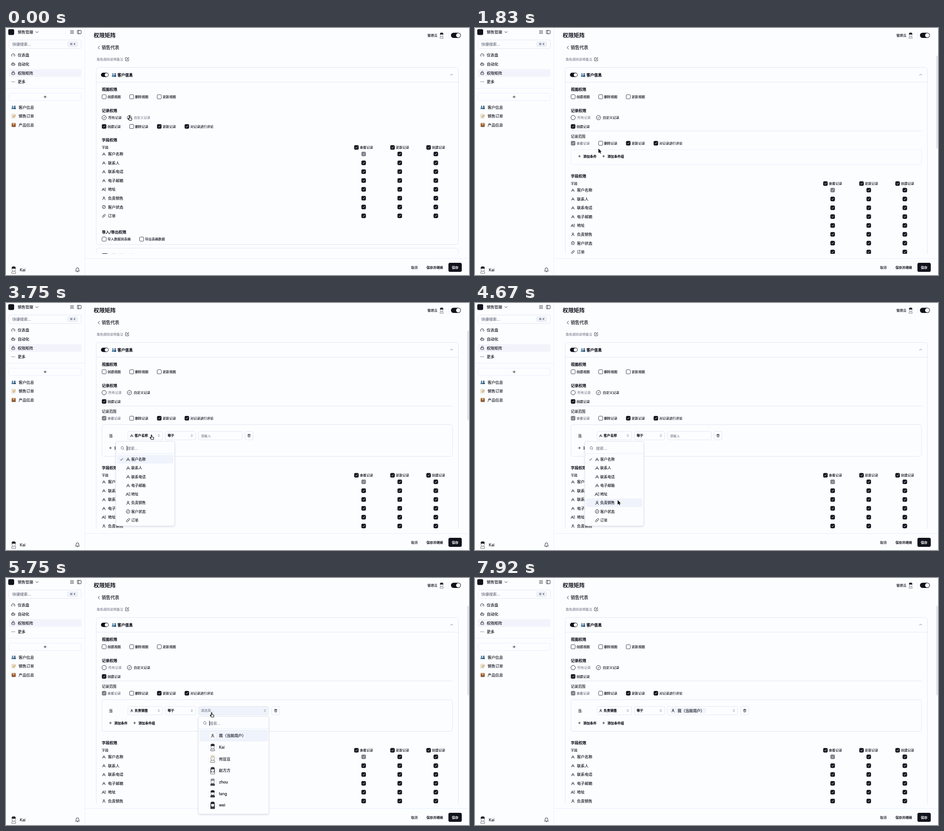
An HTML page with a canvas that plays this animation: 1024 by 547 pixels, repeating every 8000 ms.

```html
<!DOCTYPE html>
<html lang="zh-CN">
<head>
<meta charset="utf-8">
<title>权限矩阵</title>
<style>
html, body { margin: 0; width: 100%; height: 100%; overflow: hidden; background: #fcfdff; }
canvas { display: block; width: 1024px; height: 547px; }
</style>
</head>
<body>
<canvas></canvas>
<script>
const LOOP = 8000;
const INK = '#10131c', GRAY = '#676d7c', LINE = '#e3e6f0', PALE = '#e7eefc', BG = '#fcfdff', HOVER = '#eff3fb';
const canvas = document.querySelector('canvas'), ctx = canvas.getContext('2d');
const dpr = window.devicePixelRatio || 1;
canvas.width = 1024 * dpr;
canvas.height = 547 * dpr;

// Icon outlines on a 24 unit grid
const ICONS = {
  gauge: 'M12 14l4-4M4 19a10 10 0 1 1 16 0',
  bot: 'M12 8V4H8M5 8h14a2 2 0 0 1 2 2v8a2 2 0 0 1-2 2H5a2 2 0 0 1-2-2v-8a2 2 0 0 1 2-2zM1 14h2M21 14h2M15 13v2M9 13v2',
  lock: 'M5 11h14a2 2 0 0 1 2 2v7a2 2 0 0 1-2 2H5a2 2 0 0 1-2-2v-7a2 2 0 0 1 2-2zM7 11V7a5 5 0 0 1 10 0v4',
  dots: 'M3 12h2M11 12h2M19 12h2',
  menu: 'M3 5h18M3 12h18M3 19h18',
  panel: 'M4 3h16a2 2 0 0 1 2 2v14a2 2 0 0 1-2 2H4a2 2 0 0 1-2-2V5a2 2 0 0 1 2-2zM9 3v18',
  text: 'M3 21L12 4l9 17M6 15h12',
  longText: 'M0 21L8 4l8 17M3 15h10M16 5h8M18 12h6M19 20h5',
  user: 'M12 12a4.5 4.5 0 1 0 0-9 4.5 4.5 0 0 0 0 9zM4 22a8 8 0 0 1 16 0',
  status: 'M12 2a10 10 0 1 0 0 20 10 10 0 0 0 0-20zM7.5 12l3 3 6-6',
  link: 'M10 13a5 5 0 0 0 7.5.5l3-3a5 5 0 0 0-7-7l-1.7 1.7M14 11a5 5 0 0 0-7.5-.5l-3 3a5 5 0 0 0 7 7l1.7-1.7',
  search: 'M11 3a8 8 0 1 0 0 16 8 8 0 0 0 0-16zM17 17l4.5 4.5',
  edit: 'M11 3H4a2 2 0 0 0-2 2v15a2 2 0 0 0 2 2h15a2 2 0 0 0 2-2v-7M10 14l1-3 9-9 2 2-9 9z',
  bell: 'M4 17c2-2 2-4 2-8a6 6 0 0 1 12 0c0 4 0 6 2 8zM10 21h4',
  trash: 'M3 6h18M19 6v14a2 2 0 0 1-2 2H7a2 2 0 0 1-2-2V6M8 6V2h8v4M12 11v6',
  plus: 'M12 4v16M4 12h16',
  check: 'M5 13l5 5L20 6',
  down: 'M5 9l7 7 7-7',
  up: 'M5 15l7-7 7 7',
  back: 'M15 4l-7 8 7 8',
  sort: 'M7 9l5-5 5 5M7 15l5 5 5-5'
};
for (const k in ICONS) ICONS[k] = new Path2D(ICONS[k]);
const ARROW = new Path2D('M0 0v10l2.3-2.2 1.6 3.5 1.5-.7-1.5-3.4H7z');
const HAND = new Path2D('M0 .8c0-1.1 1.6-1.1 1.6 0v3.5l3.3.9c.8.2 1 .8.9 1.5L5.2 10H.4L-2.4 6.7c-.5-.9.5-1.4 1.2-.9L0 6.7z');

const FIELDS = [['text', '客户名称'], ['text', '联系人'], ['text', '联系电话'], ['text', '电子邮箱'],
  ['longText', '地址'], ['user', '负责销售'], ['status', '客户状态'], ['link', '订单']];
const ME = '我（当前用户）', OWNER = 'Kai';
const PEOPLE = [ME, OWNER, '何豆豆', '赵方方', 'zhou', 'tang', 'wei'];

const FADE = 150;
const T = { custom: 1000, addRow: 2420, open1: 3330, close1: 4830, open2: 5580, pick: 6700, close2: 6795 };

// time, x, y of the pointer tip, shape
const PATH = [[0, 272.5, 194.5, HAND], [80, 272.5, 194.5, HAND], [330, 274.5, 199, HAND], [750, 274.5, 199, HAND],
  [830, 274, 199.5, HAND], [1500, 274, 199.5, ARROW], [1830, 273, 267, ARROW], [2170, 266, 282, HAND],
  [2600, 266, 282, HAND], [2920, 321, 292, HAND], [3850, 321, 292, ARROW], [4420, 314, 462, ARROW],
  [4670, 315.5, 436.5, ARROW], [4950, 315.5, 436.5, ARROW], [5450, 454, 298, HAND], [5950, 454, 298, HAND],
  [6330, 458, 341, HAND], [7250, 458, 341, ARROW], [7750, 503, 328, ARROW], [7900, 503, 328, null], [LOOP, 503, 328, null]];

const clamp = (v, a = 0, b = 1) => Math.min(b, Math.max(a, v));
const ease = p => p * p * (3 - 2 * p);

function pointer(t) {
  const i = PATH.findIndex(k => k[0] > t) - 1, [t0, x0, y0, shape] = PATH[i], [t1, x1, y1] = PATH[i + 1];
  const p = ease((t - t0) / (t1 - t0));
  return { x: x0 + (x1 - x0) * p, y: y0 + (y1 - y0) * p, shape };
}

// y is the middle of the line; heavy thickens the strokes
function text(s, x, y, size = 7.33, color = INK, heavy = 0.15) {
  ctx.font = `${heavy >= 1 ? 'bold ' : ''}${size}px Inter, "Noto Sans CJK SC", "Noto Sans CJK", sans-serif`;
  ctx.fillStyle = ctx.strokeStyle = color;
  ctx.fillText(s, x, y + size * 0.37);
  if (heavy > 0 && heavy < 1) {
    ctx.lineWidth = heavy;
    ctx.strokeText(s, x, y + size * 0.37);
  }
}
function box(x, y, w, h, r, fill, stroke, width = 1) {
  ctx.beginPath();
  ctx.roundRect(x, y, w, h, r);
  if (fill) { ctx.fillStyle = fill; ctx.fill(); }
  if (stroke) { ctx.strokeStyle = stroke; ctx.lineWidth = width; ctx.stroke(); }
}
function disc(x, y, r, fill, stroke, width = 1) {
  box(x - r, y - r, 2 * r, 2 * r, r, fill, stroke, width);
}
function rule(x, y, w, h, color) {
  ctx.fillStyle = color;
  ctx.fillRect(x, y, w, h);
}
function icon(name, x, y, size = 9, color = INK, width = 0.9) {
  ctx.save();
  ctx.translate(x - size / 2, y - size / 2);
  ctx.scale(size / 24, size / 24);
  ctx.lineWidth = width * 24 / size;
  ctx.lineCap = ctx.lineJoin = 'round';
  ctx.strokeStyle = color;
  ctx.stroke(ICONS[name]);
  ctx.restore();
}
function toggle(x, y, w, h) {
  box(x, y, w, h, h / 2, INK);
  disc(x + w - h / 2, y + h / 2, h / 2 - 1, '#fff');
}
function tick(x, y, on = true, color = INK) {
  box(x - 4.6, y - 4.6, 9.2, 9.2, 2, on ? color : BG, color, 0.8);
  if (on) icon('check', x, y, 7, '#fff', 0.9);
}
function option(x, y, label, on, color = INK) {
  tick(x, y, on, color === INK ? INK : '#7b7e86');
  text(label, x + 7.5, y, 7.33, color);
}
function radio(x, y, label, on) {
  disc(x, y, 4.8, null, INK, 0.9);
  if (on) icon('check', x, y, 6.5);
  text(label, x + 9.5, y, 7.33, on ? INK : GRAY, on ? 0.15 : 0);
}

function peopleIcon(x, y) {
  for (const [dx, c] of [[2.4, '#27486a'], [-2.4, '#3f76a3']]) {
    box(x + dx - 2.3, y, 4.6, 4, [2, 2, 0, 0], c);
    disc(x + dx, y - 2, 1.7, c);
  }
}
function noteIcon(x, y) {
  box(x - 4.5, y - 4.5, 8, 9, 1, '#f1eee4', '#c9c3b2', 0.6);
  for (let i = 0; i < 3; i++) rule(x - 3, y - 2.5 + i * 2.2, 5, 0.7, '#9aa0aa');
  ctx.beginPath();
  ctx.moveTo(x - 1, y + 2.5);
  ctx.lineTo(x + 4.5, y - 2.5);
  ctx.lineWidth = 1.8;
  ctx.strokeStyle = '#eda63a';
  ctx.stroke();
}
function boxIcon(x, y) {
  box(x - 4.5, y - 3, 9, 7.5, 1, '#8f5c36');
  box(x - 4.5, y - 4.5, 9, 3, 1, '#b98150');
  rule(x - 1, y - 4.5, 2, 5, '#dcbb8c');
}

// Faceless bust
function avatar(x, y, k = 1, hair = '#23252c', coat = '#f4f4f6', long = false) {
  ctx.save();
  ctx.translate(x, y);
  ctx.scale(k, k);
  if (long) box(-4.7, -6.5, 9.4, 13, [4.7, 4.7, 1, 1], hair);
  box(-4.5, 3, 9, 5, [3, 3, 0.5, 0.5], coat, '#3a3c43', 0.7);
  box(-3.6, -5, 7.2, 8.5, 3.4, '#fff', '#3a3c43', 0.7);
  box(-4.5, -7.5, 9, 5, [3.5, 3.5, 1.5, 1.5], hair);
  ctx.restore();
}

function sidebar() {
  rule(174, 0, 1, 547, PALE);
  rule(0, 133, 174, 1, PALE);
  box(5, 2.5, 13, 13, 3, INK);
  text('销售管理', 26, 9, 8.5);
  icon('down', 68.5, 9, 9);
  icon('menu', 146, 9, 10);
  icon('panel', 162, 9, 10);
  box(6.5, 26.5, 160, 19, 3, BG, LINE);
  text('快捷搜索...', 14, 36, 8.5, '#50566a', 0);
  box(136.5, 30.5, 22, 11, 2.5, '#f1f4fa', LINE);
  text('⌘ K', 141, 36, 6.7, '#50566a', 0.1);
  box(6, 91, 161, 17, 3, '#f3f4fb');
  [['gauge', '仪表盘'], ['bot', '自动化'], ['lock', '权限矩阵'], ['dots', '更多']].forEach(([name, label], i) => {
    icon(name, 16, 60.2 + i * 19.6, 9);
    text(label, 26, 60.2 + i * 19.6, 8.5);
  });
  box(6.5, 144.5, 160, 16, 3, null, PALE);
  icon('plus', 86.5, 152.5, 8);
  [[peopleIcon, '客户信息'], [noteIcon, '销售订单'], [boxIcon, '产品信息']].forEach(([draw, label], i) => {
    draw(17, 175.6 + i * 19.6);
    text(label, 28, 175.6 + i * 19.6, 8.5);
  });
  avatar(17, 535.5);
  text(OWNER, 30.5, 536, 8.5);
  icon('bell', 158, 535.5, 12);
}

function frame() {
  text('权限矩阵', 194, 16.5, 12.2, INK, 1);
  text('管理员', 932, 16.5);
  avatar(963.5, 16.5, 0.82);
  rule(978, 9, 1, 14, PALE);
  toggle(984, 10.5, 22, 11.5);
  icon('back', 205.5, 43.5, 10);
  text('销售代表', 211.5, 43.5, 9.77);
  rule(175, 510, 849, 1, PALE);
  text('取消', 896, 530);
  text('保存并继续', 930, 530, 7.33, INK, 0.25);
  box(978.5, 520, 29.5, 20, 3.5, INK);
  text('保存', 986, 530, 7.33, '#fff', 0.25);
}

function cardHead(y, h, label, draw) {
  box(199.5, y, 801, h, 5, null, LINE);
  toggle(210, y + 11.5, 17, 9.5);
  draw(239, y + 16.5);
  text(label, 246.5, y + 16.3, 8.5, INK, 0.4);
}

function select(x, w, fill = BG) {
  box(x + 0.5, 284.5, w - 1, 18.5, 3, fill, LINE);
}

function condition(t) {
  const owner = t >= T.close1, picked = t >= T.pick;
  text('当', 227.5, 293.7, 8.5);
  select(269, 78, t >= 3080 && t < 3500 ? HOVER : BG);
  icon(owner ? 'user' : 'text', 278, 293.7, 7.5);
  text(owner ? '负责销售' : '客户名称', 284.5, 293.7, 7.33, INK, 0.3);
  icon('sort', 338, 293.7, 7.5, '#555b69', 0.8);
  select(352, 68);
  text('等于', 357.5, 293.7, 7.33, INK, 0.3);
  icon('sort', 411, 293.7, 7.5, '#555b69', 0.8);
  if (owner) {
    select(425, 156, t >= 5430 && t < 6050 ? HOVER : BG);
    icon('sort', 572.5, 293.7, 7.5, '#555b69', 0.8);
    if (picked) {
      box(431, 287, 81, 13, 6.5, HOVER);
      disc(438, 293.5, 6.3, '#f8f9fe', LINE, 0.7);
      icon('user', 438, 293.5, 8);
      text(ME, 448, 293.5, 8.5, INK, 0.2);
    } else text('请选择...', 431, 293.7, 7.33, GRAY, 0);
  } else {
    select(425, 98);
    text('请输入', 431, 294, 7.33, GRAY, 0);
  }
  const x = owner ? 587 : 528;
  select(x, 19);
  icon('trash', x + 9.5, 293.7, 7.5, INK, 0.8);
}

function recordScope(t) {
  const added = t >= T.addRow, y = added ? 321 : 284;
  rule(212, 227.5, 776, 1, LINE);
  text('记录范围', 212, 239.7, 8);
  option(217, 255.2, '查看记录', true, GRAY);
  box(212.5, 269.5, 775, added ? 70 : 33, 4, null, added ? LINE : PALE);
  if (added) condition(t);
  if (t > 2080 && !added) box(222, 275, 53, 18, 3, HOVER);
  icon('plus', 231, y, 7);
  text('添加条件', 239.5, y, 7.33, INK, 0.3);
  icon('plus', 284.5, y, 7);
  text('添加条件组', 293, y, 7.33, INK, 0.3);
}

function content(t) {
  const custom = t >= T.custom, dy = t >= T.addRow ? 117 : custom ? 80 : 0;
  const head = (s, y) => text(s, 212, y, 8.5, INK, 0.35);
  ctx.save();
  ctx.beginPath();
  ctx.rect(175, 61, 849, 439);
  ctx.clip();
  text('角色规则说明备注', 200.5, 69, 7.33, GRAY, 0);
  icon('edit', 268, 69, 9, INK, 0.8);
  cardHead(87.5, 392 + dy, '客户信息', peopleIcon);
  rule(200, 119.5, 800, 1, LINE);
  icon('up', 985.5, 103.5, 9, '#50566a', 0.8);
  head('视图权限', 136);
  ['创建视图', '删除视图', '更新视图'].forEach((s, i) => option(217 + i * 61, 152.3, s, false));
  head('记录权限', 182.7);
  radio(217, 198.5, '所有记录', !custom);
  radio(273, 198.5, '自定义记录', custom);
  option(217, 218, '创建记录', true);
  if (custom) recordScope(t);
  ['删除记录', '更新记录', '对记录进行评论'].forEach((s, i) => option(278 + i * 61, custom ? 255.2 : 218, s, i > 0));
  ctx.translate(0, dy);
  head('字段权限', 248.2);
  text('字段', 212, 264.5);
  ['查看记录', '更新记录', '创建记录'].forEach((s, i) => option(775 + i * 79.8, 264.5, s, true));
  FIELDS.forEach(([name, label], i) => {
    const y = 279 + i * 19.57;
    icon(name, 216.5, y, 8.5);
    text(label, 225.5, y, 8.5);
    for (let c = 0; c < 3; c++) tick(791 + c * 79.8, y, true, i + c ? INK : '#7b7e86');
  });
  head('导入/导出权限', 451.5);
  option(217, 467.5, '导入数据到表格', false);
  option(300, 467.5, '导出表格数据', false);
  cardHead(487.5, 392, '销售订单', noteIcon);
  ctx.restore();
  // The scrollbar stays hidden until an open menu is gone
  const locked = t >= 4080 && t < T.close1 + FADE || t >= 6500 && t < T.close2 + FADE;
  if (custom && !locked) box(1020, 61, 4, dy > 80 ? 199 : 206, 2, '#e0e3eb');
}

// Menu that fades and zooms around its centre
function popup(t, open, close, x, y, w, h, body) {
  const p = clamp((t - open) / FADE) * (1 - clamp((t - close) / FADE)), k = 0.95 + 0.05 * p;
  if (!p) return;
  ctx.save();
  ctx.globalAlpha = p;
  ctx.translate(x + w / 2, y + h / 2);
  ctx.scale(k, k);
  ctx.translate(-x - w / 2, -y - h / 2);
  ctx.shadowColor = `rgba(20,30,60,${0.16 * p})`;
  ctx.shadowBlur = 4 * dpr;
  ctx.shadowOffsetY = 1.5 * dpr;
  box(x, y, w, h, 4, BG);
  ctx.shadowColor = 'transparent';
  box(x, y, w, h, 4, null, LINE);
  icon('search', x + 14.5, 321.3, 8.5, GRAY);
  text('搜索...', x + 24.5, 321.5, 8.5, GRAY, 0);
  if (Math.floor((t - open) / 700) % 2 === 0) rule(x + 24, 316, 1, 11, INK);
  rule(x, 333, w, 1, PALE);
  body();
  ctx.restore();
}

function fieldMenu(t, cursor) {
  popup(t, T.open1, T.close1, 243, 306.5, 130, 187, () => {
    const hover = clamp(Math.round((cursor.y - 346) / 19.3), 0, 7);
    box(246, 336.5 + hover * 19.3, 124, 19, 3, HOVER);
    icon('check', 255.5, 346.3, 9);
    FIELDS.forEach(([name, label], i) => {
      icon(name, 270, 346.2 + i * 19.25, 9.5);
      text(label, 277, 346.2 + i * 19.25, 8);
    });
  });
}

function peopleMenu(t) {
  const looks = [, ['#23252c', '#dcdde2'], ['#d8d2b4', '#f6f4e8'], ['#34363d', '#f4f4f6', true],
    ['#8c8f98', '#44464e'], ['#23252c', '#34363d'], ['#1d1f26', '#34363d', true]];
  popup(t, T.open2, T.close2, 425.5, 306.5, 155.5, 216, () => {
    if (t < T.close2) box(428, 336, 151, 26, 3, HOVER);
    if (t >= T.pick) icon('check', 438.5, 349.3, 9);
    PEOPLE.forEach((name, i) => {
      const y = 349.2 + i * 25.65;
      disc(457, y, 8.7, '#fbfbfe', LINE, 0.7);
      if (i) avatar(457, y, 1, ...looks[i]);
      else icon('user', 457, y, 9.5);
      text(name, 471, y, 8.5, INK, 0.2);
    });
  });
}

function drawPointer({ x, y, shape }) {
  if (!shape) return;
  const hand = shape === HAND;
  ctx.save();
  ctx.translate(x, y);
  ctx.lineJoin = 'round';
  ctx.lineWidth = hand ? 1.1 : 1.4;
  ctx.strokeStyle = hand ? '#000' : '#fff';
  ctx.fillStyle = hand ? '#fff' : '#000';
  if (hand) ctx.fill(shape);
  ctx.stroke(shape);
  if (!hand) ctx.fill(shape);
  ctx.restore();
}

function draw(now) {
  const t = now % LOOP, cursor = pointer(t);
  ctx.setTransform(dpr, 0, 0, dpr, 0, 0);
  rule(0, 0, 1024, 547, BG);
  sidebar();
  frame();
  content(t);
  fieldMenu(t, cursor);
  peopleMenu(t);
  drawPointer(cursor);
  requestAnimationFrame(draw);
}
requestAnimationFrame(draw);
</script>
</body>
</html>
```
